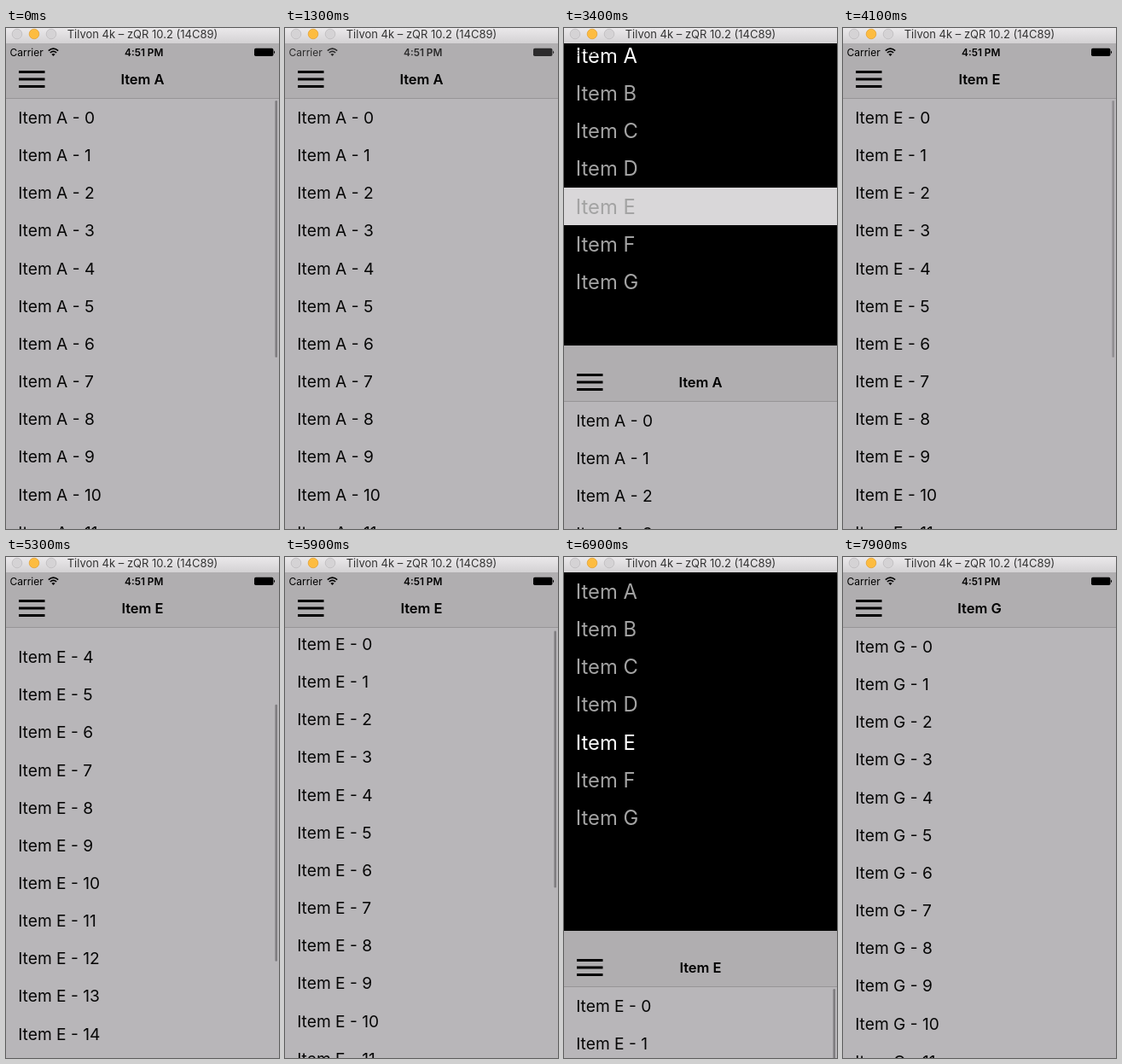
Write an HTML page that moves like this. It is 320 by 587 pixels and loops after 8 s.

```html
<!DOCTYPE html>
<html lang="en">
<head>
<meta charset="utf-8">
<title>Side menu</title>
<style>
  html, body { margin: 0; width: 100%; height: 100%; overflow: hidden; background: #000; }
  svg { display: block; width: 100vw; height: 100vh; }
  text { font-family: Inter, "Liberation Sans", sans-serif; white-space: pre; }
  .menu { font-size: 23.8px; fill: #a3a3a3; }
  .menu .on { fill: #fff; }
  .list { font-size: 19.2px; fill: #060606; }
  .heading { font-size: 16.5px; font-weight: 600; text-anchor: middle; }
  .status { font-size: 12px; }
  .clock { font-size: 11.8px; font-weight: 600; text-anchor: middle; }
  .window { font-size: 13px; text-anchor: middle; fill: #333; }
</style>
</head>
<body>
<svg viewBox="0 0 320 587" preserveAspectRatio="none">
  <defs>
    <linearGradient id="chrome" x2="0" y2="1">
      <stop offset="0" stop-color="#ebe9eb"/>
      <stop offset="1" stop-color="#d3d1d3"/>
    </linearGradient>
  </defs>
  <rect width="320" height="587"/>
  <g id="menu" class="menu">
    <rect id="glow" width="320" height="44" fill="#d9d7d9"/>
  </g>
  <g id="panel">
    <rect y="17" width="320" height="570" fill="#b8b6b9"/>
    <g id="list" class="list"></g>
    <rect id="bar" x="315.4" width="2.6" height="301" rx="1.3" fill="#7f7d80"/>
    <rect y="17" width="320" height="65" fill="#b0aeb0"/>
    <rect y="82" width="320" height="1" fill="#979597"/>
    <path d="M15 51.5h30.5M15 60h30.5M15 68.5h30.5" stroke="#000" stroke-width="3"/>
    <text id="heading" class="heading" x="160" y="66"></text>
  </g>
  <g id="status" class="status">
    <text x="4.5" y="32.5">Carrier</text>
    <g fill="none" stroke="#000" stroke-width="1.6">
      <path d="M49.8 26.6q5.7-5 11.4 0M51.8 29q3.7-3.2 7.4 0"/>
    </g>
    <path d="M53.4 30.8q2.1-1.6 4.2 0l-2.1 2.2z"/>
    <text class="clock" x="161.7" y="32.5">4:51 PM</text>
    <rect x="291" y="23.8" width="22.4" height="9.2" rx="1.8"/>
    <path d="M314 26.6q2.4 1.8 0 3.6z"/>
  </g>
  <rect width="320" height="18" fill="url(#chrome)"/>
  <g fill="#d5d3d5" stroke="#bebcbe" stroke-width=".8">
    <circle cx="13" cy="7" r="5.8"/>
    <circle cx="33" cy="7" r="5.8" fill="#fdbc40" stroke="#e2a336"/>
    <circle cx="53" cy="7" r="5.8"/>
  </g>
  <text class="window" x="160" y="11.8">Tilvon 4k – zQR 10.2 (14C89)</text>
</svg>
<script>
const LOOP = 8000, STEP = 100, ROW = 44.15, OPEN = 421, SLIDE = 400;
const $ = id => document.getElementById(id);
const letters = [..."ABCDEFG"];

// [time, value] pairs, linear in between
const scroll = [[4400, 0], [4500, 70], [4600, 190], [4700, 250], [5100, 250],
  [5200, 221], [5300, 164.5], [5400, 106], [5500, 62], [5600, 34],
  [5700, 17], [5800, 8], [5900, 3], [6000, 0]];
const barFade = [[0, 1], [500, 0], [3800, 0], [3900, 1], [4000, 1], [4300, 0],
  [4400, 0], [4500, 1], [7800, 1], [7900, 0]];
const statusFade = [[1250, 1], [1450, 0], [3300, 0], [3450, 1],
  [6200, 1], [6400, 0], [7400, 0], [7550, 1]];
// [start, opens]
const slides = [[1312, true], [3290, false], [6223, true], [7390, false]];

function track(points, t) {
  if (t <= points[0][0]) return points[0][1];
  for (let i = 1; i < points.length; i++) {
    const [t0, a] = points[i - 1], [t1, b] = points[i];
    if (t < t1) return a + (b - a) * (t - t0) / (t1 - t0);
  }
  return points[points.length - 1][1];
}

// ease-in-out: cubic-bezier(.42, 0, .58, 1)
function ease(x) {
  if (x <= 0 || x >= 1) return x <= 0 ? 0 : 1;
  let lo = 0, hi = 1, u = .5;
  for (let i = 0; i < 20; i++) {
    u = (lo + hi) / 2;
    const bx = 3 * (1 - u) ** 2 * u * .42 + 3 * (1 - u) * u * u * .58 + u ** 3;
    if (bx < x) lo = u; else hi = u;
  }
  return u * u * (3 - 2 * u);
}

function openness(t) {
  let p = 0;
  for (const [start, opens] of slides) {
    if (t < start) break;
    const e = ease((t - start) / SLIDE);
    p = opens ? e : 1 - e;
  }
  return p;
}

function addText(parent, x, y, str) {
  const el = document.createElementNS("http://www.w3.org/2000/svg", "text");
  el.setAttribute("x", x);
  el.setAttribute("y", y);
  el.textContent = str;
  parent.append(el);
  return el;
}

const entries = letters.map((c, i) => addText($("menu"), 13.8, 49 + i * ROW, "Item " + c));
const rows = Array.from({ length: 20 }, (_, i) => addText($("list"), 14.2, 112 + i * ROW, ""));
const shift = (el, y) => el.setAttribute("transform", `translate(0 ${y.toFixed(2)})`);

let shown = "";
function setItem(c) {
  if (c === shown) return;
  shown = c;
  $("heading").textContent = "Item " + c;
  rows.forEach((el, i) => el.textContent = `Item ${c} - ${i}`);
  entries.forEach((el, i) => el.classList.toggle("on", letters[i] === c));
}

function render(t) {
  const p = openness(t), y = track(scroll, t);
  setItem(t < 3800 ? "A" : t < 7900 ? "E" : "G");
  shift($("panel"), Math.round(OPEN * p));
  shift($("menu"), Math.round(-50 * (1 - p)));
  shift($("list"), -y);
  $("bar").setAttribute("y", 85 + y * .534);
  $("bar").setAttribute("opacity", track(barFade, t));
  $("status").setAttribute("opacity", track(statusFade, t));
  const pressed = t >= 2900 && t < 3800 ? 4 : t >= 7000 && t < 7900 ? 6 : -1;
  $("glow").setAttribute("opacity", pressed < 0 ? 0 : 1);
  $("glow").setAttribute("y", 18.4 + Math.max(pressed, 0) * ROW);
}

function tick() {
  const t = performance.now() % LOOP;
  render(Math.floor(t / STEP) * STEP);
  requestAnimationFrame(tick);
}
tick();
</script>
</body>
</html>
```
